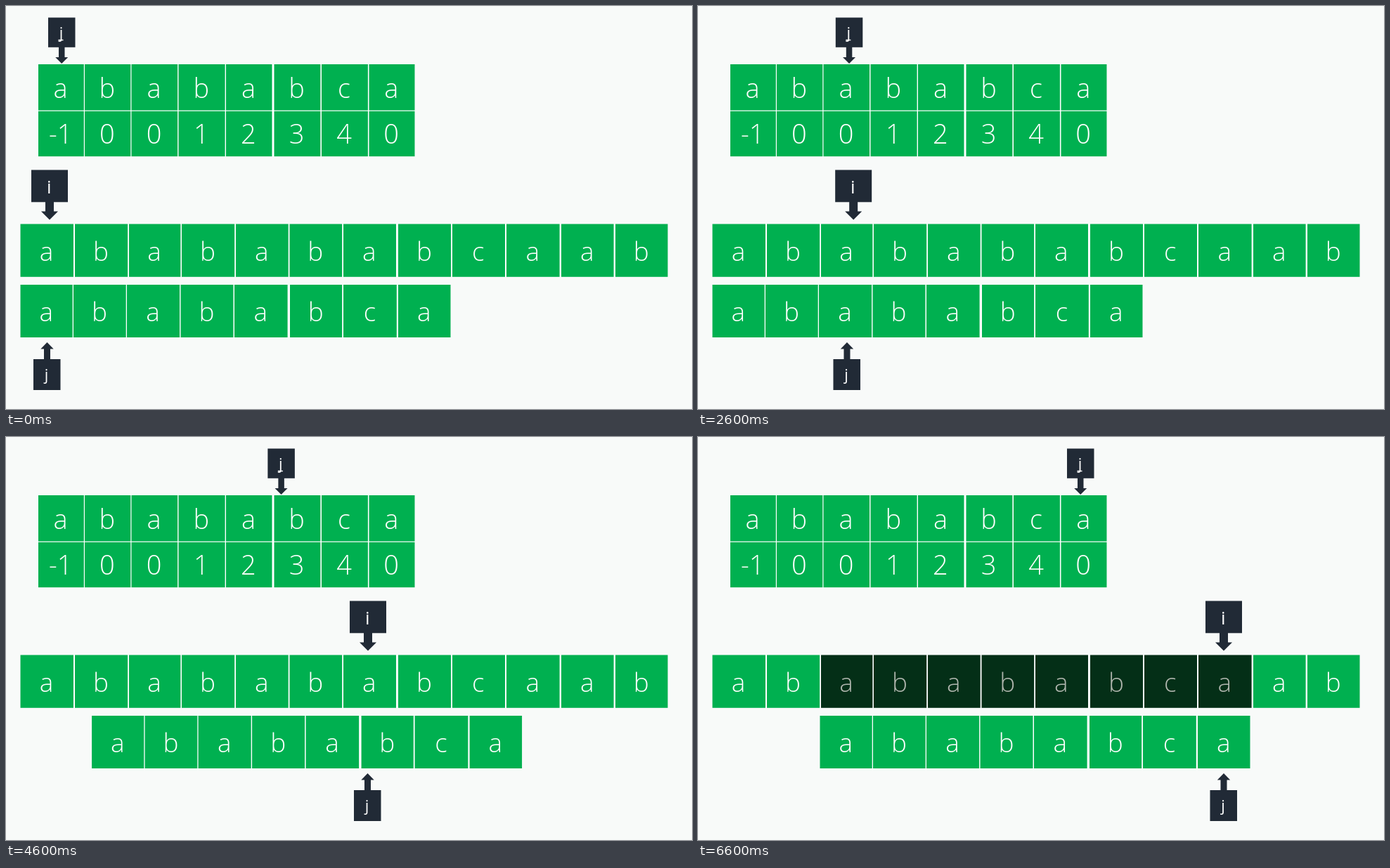
Recreate the animation shown at these times as an HTML page. Size 976 px wide and 574 px high, loop 8100 ms.

```html
<!DOCTYPE html>
<html lang="en">
<head>
<meta charset="utf-8">
<title>String matching with a prefix table</title>
<style>
  html, body { margin: 0; width: 100%; height: 100%; overflow: hidden; background: #f8faf9; }
  svg { display: block; width: 976px; height: 574px; }
  text { font-family: "Open Sans", "Noto Sans", sans-serif; text-anchor: middle; fill: #fff; }
  .cell text { font-weight: 300; }
</style>
</head>
<body>
<svg id="stage" viewBox="0 0 976 574" xmlns="http://www.w3.org/2000/svg">
  <g id="tools" fill="none" stroke="#d9dbda" stroke-width="1.2">
    <circle cx="-7" cy="571" r="12"/>
    <circle cx="25" cy="571" r="12"/>
    <circle cx="56" cy="571" r="12"/>
    <circle cx="87" cy="571" r="12"/>
    <path d="M18 565h4M24 565h4M18 568h4M22 569h10v7h-10zM19 571v5" stroke-width="2"/>
    <circle cx="55" cy="569" r="4.5" stroke-width="1.8"/>
    <path d="M58 572l4 4" stroke-width="2"/>
    <path d="M81 571h3M86 571h3M91 571h3" stroke-width="2.5"/>
  </g>
</svg>
<script>
const LOOP = 8100, TICK = 100, START = 1625, MOVE = 450;
const GREEN = [0, 176, 80], DARK = [4, 47, 23];
const WHITE = [255, 255, 255], GREY = [176, 182, 174];
const INK = "#212a36";
const stage = document.getElementById("stage");
const tools = document.getElementById("tools");

function add(parent, tag, attrs, label) {
  const el = document.createElementNS(stage.namespaceURI, tag);
  for (const key in attrs) el.setAttribute(key, attrs[key]);
  if (label !== undefined) el.textContent = label;
  parent.appendChild(el);
  return el;
}

const rgb = c => `rgb(${c.map(Math.round).join()})`;
const mix = (a, b, k) => a.map((v, n) => v + (b[n] - v) * k);
const clamp = v => Math.min(1, Math.max(0, v));
const ease = k => k * k * (3 - 2 * k);

// edges: left side of each cell; gaps: white space after each cell
function row(labels, edges, gaps, right, y, h, base, size, nudge) {
  const g = add(stage, "g", { class: "cell" });
  add(g, "rect", { x: edges[0], y, width: right - edges[0], height: h, fill: "#fff" });
  const cells = labels.map((label, n) => {
    const x = edges[n];
    const end = n + 1 < edges.length ? edges[n + 1] - gaps[n] : right;
    const box = add(g, "rect", { x, y, width: end - x, height: h, fill: rgb(GREEN) });
    const text = add(g, "text", { x: (x + end) / 2 + nudge, y: base, "font-size": size }, label);
    return { box, text };
  });
  return { g, cells };
}

const tableEdges = [46, 112, 178.5, 245.5, 313, 381.5, 449, 516.5];
const tableGaps = [1.2, 1.2, 1.4, 1.4, 3, 1.6, 1.6];
add(stage, "rect", { x: 46, y: 83, width: 535.5, height: 131, fill: "#fff" });
row([..."abababca"], tableEdges, tableGaps, 581.5, 83, 65.6, 131, 38, -0.8);
row(["-1", ..."0012340"], tableEdges, tableGaps, 581.5, 149.8, 64.4, 196, 38, -0.8);

const textRow = row([..."abababababcaab".replace("ababab", "abab")],
  [20.5, 98, 175, 250, 327, 403.5, 480, 558, 635, 712, 790, 867],
  [2, 1.8, 1.6, 1.8, 1.8, 1.8, 3, 2, 2, 2.4, 2.4], 941.5, 310.5, 75.3, 363, 37, -0.6);
const pattern = row([..."abababca"],
  [20.5, 96, 172, 248.5, 325, 404, 480, 558],
  [1.3, 1.3, 1.4, 1.5, 3.4, 1.8, 2.2], 632.5, 397, 75, 449, 37, -0.4);

// Every pointer is drawn with its box starting at x = 0
function pointer(y, w, h, arrow, label, base, size, underline) {
  const g = add(stage, "g", {});
  add(g, "rect", { y, width: w, height: h, fill: INK });
  add(g, "path", { d: arrow, fill: INK });
  add(g, "text", { x: w / 2 - 0.8, y: base, "font-size": size }, label);
  if (underline) add(g, "path", { d: "M14.5 48.5h7", stroke: "#fff", "stroke-width": 1.5 });
  return g;
}

const markers = [
  { g: pointer(16.5, 38.5, 42.3, "M15 58h8.5v15h4.7l-9 9l-9-9h4.8z", "j", 46, 22, true),
    stops: [60, 122.4, 191, 256, 320, 388, 460, 328, 394, 454, 525] },
  { g: pointer(233.5, 52, 45.8, "M20 279h12v13.5h6l-12 12l-12-12h6z", "i", 267, 26),
    stops: [36, 116.8, 190, 260, 338, 402, 489, 489, 566, 640, 722] },
  { g: pointer(503, 38.5, 44, "M15 503v-14.5h-4.7l9.2-9.5l9.2 9.5h-4.7v14.5z", "j", 533, 22),
    stops: [39, 111.3, 187, 261, 337, 420.3, 495, 495, 567, 648, 728.5] }
];

const shift = (el, x) => el.setAttribute("transform", `translate(${x.toFixed(2)} 0)`);

function along(stops, pos) {
  const n = Math.min(Math.floor(pos), stops.length - 2);
  return stops[n] + (stops[n + 1] - stops[n]) * ease(pos - n);
}

function draw(time) {
  const t = Math.floor((time % LOOP) / TICK) * TICK;
  const pos = Math.min(10, Math.max(0, (t - START) / MOVE));
  for (const m of markers) shift(m.g, along(m.stops, pos));
  shift(pattern.g, 153 * ease(clamp(pos - 6)));

  const fade = clamp((t - START - 10 * MOVE) / MOVE);
  for (const { box, text } of textRow.cells.slice(2, 10)) {
    box.setAttribute("fill", rgb(mix(GREEN, DARK, fade)));
    text.style.fill = rgb(mix(WHITE, GREY, fade));
  }
  const shown = (t >= 700 && t < 2300) || (t >= 3500 && t < 4500);
  tools.setAttribute("visibility", shown ? "visible" : "hidden");
}

let origin;
function tick(now) {
  origin ??= now;
  draw(now - origin);
  requestAnimationFrame(tick);
}
draw(0);
requestAnimationFrame(tick);
</script>
</body>
</html>
```
